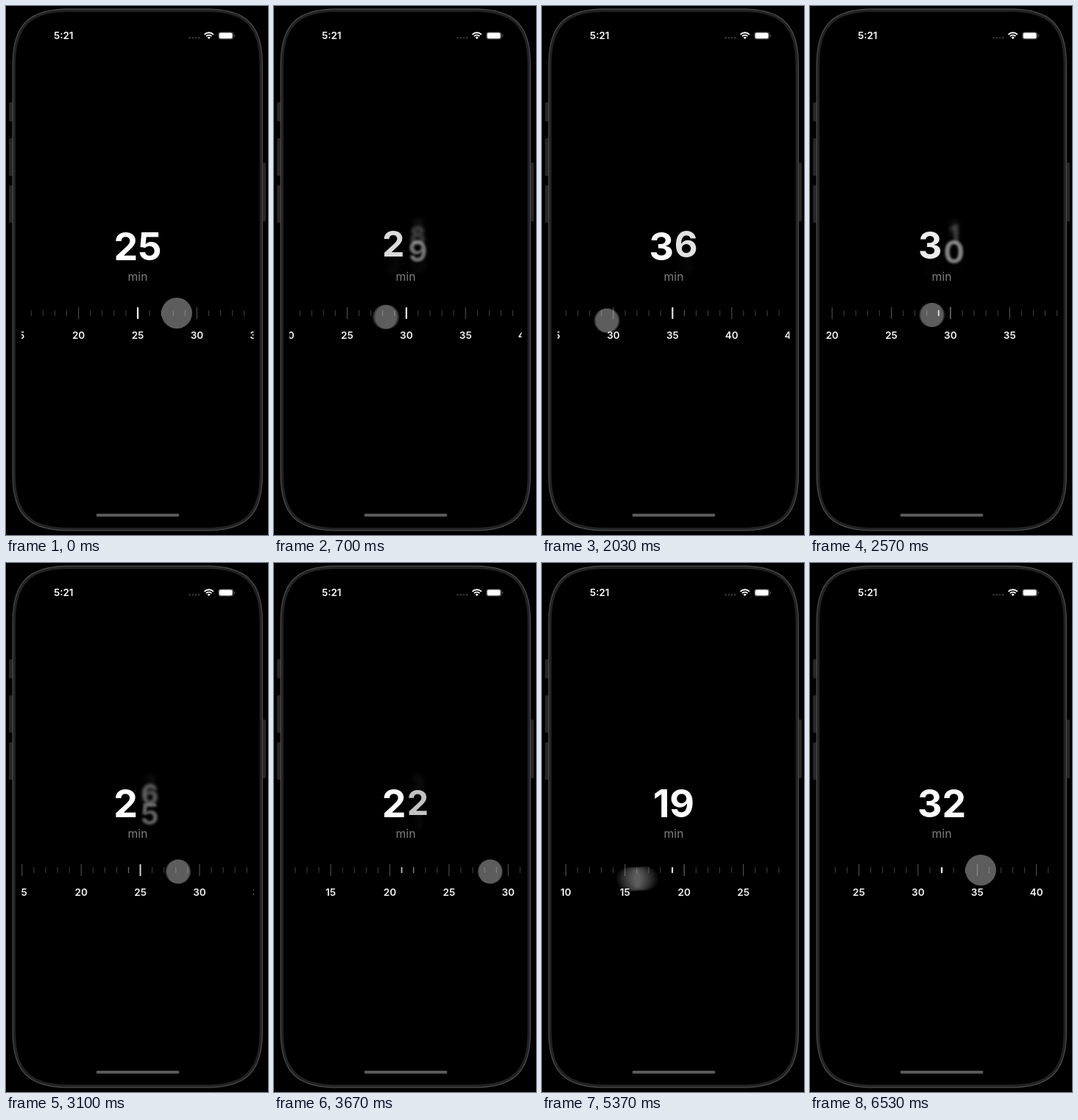
Animation, 356 px wide and 720 px high, one loop 6.61 s. Source, as an HTML page with a canvas:

```html
<!DOCTYPE html>
<html lang="en">
<head>
<meta charset="utf-8">
<title>Minute picker</title>
<style>
  html, body { margin: 0; width: 100%; height: 100%; overflow: hidden; background: #000; }
  canvas { display: block; width: 356px; height: 720px; }
</style>
</head>
<body>
<canvas id="stage"></canvas>
<script>
const W = 356, H = 720, LOOP = 6610;
const MID = 179, STEP = 16.08;
const FONT = 'Inter, "Liberation Sans", sans-serif';
const BIG = `700 52px ${FONT}`;

const canvas = document.getElementById('stage');
const dpr = window.devicePixelRatio || 1;
canvas.width = W * dpr;
canvas.height = H * dpr;
const ctx = canvas.getContext('2d');

const inOut = u => (1 - Math.cos(Math.PI * u)) / 2;
const outSine = u => Math.sin(Math.PI * u / 2);
const outQuad = u => u * (2 - u);

// A value that eases to each move's goal in turn
function track(initial, ...moves) {
  return t => moves.reduce((v, [from, to, goal, ease = inOut]) => {
    const u = Math.min(Math.max((t - from) / (to - from), 0), 1);
    return v + (goal - v) * ease(u);
  }, initial);
}

// Drag left, drag slowly right, flick left, return
const touchX = track(232, [50, 1472, 48], [1760, 5010, 356, outSine], [5130, 5487, 58], [5650, 6500, 232]);
const touchY = track(418, [50, 1472, 430], [1760, 2700, 420], [5130, 5487, 433], [5650, 6500, 418]);
const touchR = track(21, [50, 250, 16.5], [5650, 5850, 21]);
const ruler = track(25, [50, 1472, 36.4], [1925, 4755, 18.75, outQuad], [5260, 6300, 32]);

// Critically damped spring from 0 to 1
function spring(ms) {
  if (ms <= 0) return 0;
  const k = ms * 0.0187;
  return 1 - (1 + k) * Math.exp(-k);
}

// Moments at which the rounded value changes
const changes = [{ at: -2000, value: 25 }];
for (let t = 0; t < LOOP; t += 2) {
  const value = Math.round(ruler(t));
  if (value !== changes[changes.length - 1].value) changes.push({ at: t, value });
}

function digitCentres(value) {
  ctx.font = BIG;
  const [a, b] = [...String(value)].map(c => ctx.measureText(c).width);
  return [MID - b / 2, MID + a / 2];
}

function makeSlots() {
  return [0, 1].map(i => {
    const digits = [], centres = [];
    for (const { at, value } of changes) {
      const char = String(value)[i];
      centres.push({ at, x: digitCentres(value)[i] });
      if (!digits.length || digits[digits.length - 1].char !== char) digits.push({ at, char });
    }
    return { digits, centres };
  });
}

function label(text, x, y, size, weight, color, align = 'center') {
  ctx.font = `${weight} ${size}px ${FONT}`;
  ctx.textAlign = align;
  ctx.fillStyle = color;
  ctx.fillText(text, x, y);
}

function box(x, y, w, h, r, color) {
  ctx.fillStyle = color;
  ctx.beginPath();
  ctx.roundRect(x, y, w, h, r);
  ctx.fill();
}

function disc(x, y, r, color) {
  ctx.fillStyle = color;
  ctx.beginPath();
  ctx.arc(x, y, r, 0, Math.PI * 2);
  ctx.fill();
}

// Phone outline with continuous corners, shrunk by an inset
function shell(inset, color) {
  const w = 170.25 - inset, h = 355.5 - inset, r = 61 - inset;
  const reach = r * 1.28, pull = r * 0.355;
  const quarter = (sx, sy) => {
    const pts = [[w, h - reach], [w, h - pull], [w - pull, h], [w - reach, h]]
      .map(([x, y]) => [sx * x, sy * y]);
    if (sx !== sy) pts.reverse();
    ctx.lineTo(...pts[0]);
    ctx.bezierCurveTo(...pts[1], ...pts[2], ...pts[3]);
  };
  ctx.save();
  ctx.translate(178.75, 359);
  ctx.fillStyle = color;
  ctx.beginPath();
  quarter(1, 1);
  quarter(-1, 1);
  quarter(-1, -1);
  quarter(1, -1);
  ctx.fill();
  ctx.restore();
}

function drawPhone() {
  for (const [y, h] of [[131, 26], [180, 51], [244, 51]]) box(4, y, 6, h, 1.5, '#262626');
  box(348, 213, 5, 80, 1.5, '#262626');
  shell(0, '#4c4c4c');
  shell(1.2, '#222');
  shell(4.5, '#000');
  box(122.5, 691, 113, 4, 2, '#595959');
}

function drawStatus() {
  label('5:21', 65, 44.8, 13.4, 600, '#fff', 'left');
  for (let i = 0; i < 4; i++) disc(249.5 + i * 4.2, 43.3, 1.2, '#3c3c3c');

  // Wi-Fi fan
  const cx = 275.7, cy = 45, from = -Math.PI * 0.75, to = -Math.PI * 0.25;
  ctx.strokeStyle = '#fff';
  ctx.lineWidth = 1.9;
  for (const r of [5.4, 8.7]) {
    ctx.beginPath();
    ctx.arc(cx, cy, r, from, to);
    ctx.stroke();
  }
  ctx.fillStyle = '#fff';
  ctx.beginPath();
  ctx.moveTo(cx, cy);
  ctx.arc(cx, cy, 3, from, to);
  ctx.fill();

  // Battery
  box(288.3, 35.2, 21, 10.2, 3, '#444');
  box(289.7, 36.4, 17.8, 7.8, 2.2, '#fff');
  box(310, 38.8, 1.2, 3, 0.6, '#555');
}

function drawDigits(t) {
  ctx.textAlign = 'center';
  for (const { digits, centres } of slots) {
    let x = centres[0].x;
    for (let i = 1; i < centres.length; i++) {
      x += (centres[i].x - centres[i - 1].x) * spring(t - centres[i].at);
    }
    digits.forEach(({ at, char }, i) => {
      const next = digits[i + 1];
      const enter = spring(t - at), leave = next ? spring(t - next.at) : 0;
      const alpha = Math.pow(enter, 1.5) * (1 - leave);
      if (alpha < 0.01) return;
      const scale = (0.5 + 0.5 * enter) * (1 - 0.5 * leave);
      const blur = 3.5 * (1 - enter) + 3.5 * leave;
      ctx.save();
      ctx.globalAlpha = alpha;
      if (blur > 0.1) ctx.filter = `blur(${blur * dpr}px)`;
      ctx.translate(x, 327.6 + 29 * (1 - enter - leave));
      ctx.scale(scale, scale);
      ctx.font = BIG;
      ctx.fillStyle = '#fff';
      ctx.fillText(char, 0, 18.7);
      ctx.restore();
    });
  }
}

// Ticks light up as they near the centre
function drawRuler(t) {
  const value = ruler(t), nearest = Math.round(value);
  ctx.save();
  ctx.beginPath();
  ctx.rect(21, 400, 315.5, 60);
  ctx.clip();
  for (let n = nearest - 11; n <= nearest + 11; n++) {
    const x = MID + (n - value) * STEP;
    const major = n % 5 === 0;
    const lit = Math.max(0, 1 - Math.abs(n - value));
    const base = major ? 88 : 66;
    const shade = Math.round(base + (255 - base) * lit);
    const w = 1 + 1.2 * lit, h = major ? 16 : 8;
    box(x - w / 2, 418 - h / 2, w, h, 0.8 * lit, `rgb(${shade},${shade},${shade})`);
    if (major) label(n, x, 452.8, 13.5, 600, '#f4f4f4');
  }
  ctx.restore();
}

// Soft touch dot, smeared along its path while it moves fast
function drawTouch(t) {
  const samples = 8, shutter = 24;
  const alpha = 1 - Math.pow(1 - 0.37, 1 / samples);
  for (let i = 0; i < samples; i++) {
    const s = t + shutter * ((i + 0.5) / samples - 0.5);
    disc(touchX(s), touchY(s), touchR(s), `rgba(255,255,255,${alpha})`);
  }
}

function draw(t) {
  ctx.setTransform(dpr, 0, 0, dpr, 0, 0);
  ctx.fillStyle = '#000';
  ctx.fillRect(0, 0, W, H);
  drawPhone();
  drawStatus();
  drawDigits(t);
  label('min', MID, 374, 15.7, 400, '#7e7e80');
  drawRuler(t);
  drawTouch(t);
}

const slots = makeSlots();
const start = performance.now();
function tick() {
  draw((performance.now() - start) % LOOP);
  requestAnimationFrame(tick);
}
tick();
</script>
</body>
</html>
```
